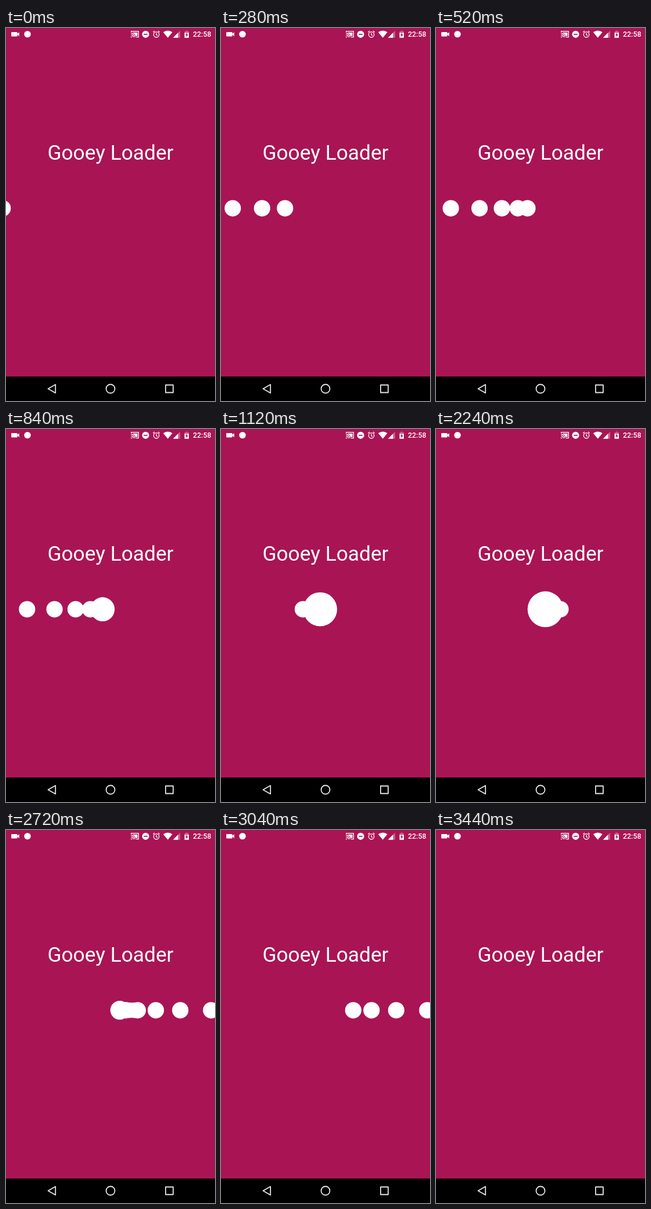
Animation, 360 px wide and 640 px high, one loop 3.52 s. Source, as an HTML page:

```html
<!DOCTYPE html>
<html lang="en">
<head>
<meta charset="utf-8">
<title>Gooey Loader</title>
<style>
  html, body { margin: 0; width: 100%; height: 100%; overflow: hidden; background: #a91454; }
  svg { display: block; width: 360px; height: 640px; }
  text { font-family: Roboto, sans-serif; fill: #fff; }
  .title { font-size: 35.3px; text-anchor: middle; }
  .clock { font-size: 12.4px; font-weight: 500; text-anchor: end; }
  .status { fill: #fff; }
  .line { fill: none; stroke: #fff; stroke-width: 1.3; }
  .cut { fill: none; stroke: #a91454; stroke-width: 1.7; }
  .dim { opacity: .32; }
  .nav { fill: none; stroke: #e4e4e4; stroke-width: 1.8; stroke-linejoin: round; }
</style>
</head>
<body>
<svg viewBox="0 0 360 640">
  <rect width="360" height="640" fill="#a91454"/>

  <g class="status">
    <path d="M10 6.9h8.6q.9 0 .9.9v2l3.3-2.6v7l-3.3-2.6v2q0 .9-.9.9h-8.600q-.9 0-.9-.9v-5.800q0-.9.9-.9z"/>
    <circle cx="37" cy="10.600" r="5.700"/>
    <path class="line" d="M215.700 7.600V5.700h12.600v10h-4.300M215.300 9.200a6.800 6.800 0 0 1 6.800 6.800M215.300 11.800a4.200 4.200 0 0 1 4.200 4.200"/>
    <path d="M218 7.700h8.400v6h-3.300a8 8 0 0 0-5.100-5.400zM215 14.200a2 2 0 0 1 2 2h-2z"/>
    <circle cx="240.500" cy="10.800" r="6.100"/>
    <path class="cut" d="M237.300 10.800h6.400"/>
    <circle class="line" cx="259" cy="11.300" r="4.700"/>
    <path class="line" d="M259 8.600v3l2.100 1.300M253.300 7.300l2.700-2.300M264.700 7.300l-2.700-2.300"/>
    <path d="M270.800 7.300a12.300 12.300 0 0 1 15.800 0l-7.900 9.500z"/>
    <path class="dim" d="M287.800 16.700h12.200v-12.200z"/>
    <path d="M287.800 16.700h8.600v-8.600z"/>
    <path class="dim" d="M307.500 5.700h2.100v-1.300h3.300v1.300h2.100v4h-7.500z"/>
    <path d="M307.500 8.200h7.500v8.600h-7.500z"/>
    <path fill="#a91454" d="M311.900 7.700l-2.900 4.700h1.800v3.300l2.800-4.700h-1.700z"/>
  </g>
  <text class="clock" x="353.500" y="15.300">22:58</text>

  <text class="title" x="180" y="226">Gooey Loader</text>
  <path id="blob" fill="#fff"/>

  <rect y="598" width="360" height="42" fill="#000"/>
  <g class="nav">
    <path d="M85.200 611.800v14.400l-12.700-7.200z"/>
    <circle cx="180" cy="619" r="7.500"/>
    <rect x="274.900" y="612.500" width="13" height="13"/>
  </g>
</svg>
<script>
const LOOP = 3520, STEP = 40;
const COUNT = 8, DOT = 14.1, CORE = 35.2, Y = 309.3;
const LEFT = 163, RIGHT = 197, CURVE = 5.5;
const BORN = 620, GONE = 2790, GROW = 700;
const blob = document.getElementById('blob');

const circle = (x, r) =>
  `M${x - r} ${Y}a${r} ${r} 0 1 1 ${2 * r} 0a${r} ${r} 0 1 1 ${-2 * r} 0z`;

// Dot spacings left until the leading dot reaches the core.
const incoming = t => t < 520 ? 5.54 - 4.54 * t / 520 : 1 - (t - 520) / 100;
// Dot spacings travelled by the leading dot since it left the core.
const outgoing = t => (t - 2052) / 105.5;

// Sticky neck between the core and a nearby dot.
function neck(c, r, x) {
  const mid = (c + x) / 2, waist = DOT * 0.8;
  const [a, ra, b, rb] = c < x ? [c, r, x, DOT] : [x, DOT, c, r];
  return `M${a} ${Y - ra}Q${mid} ${Y - waist} ${b} ${Y - rb}` +
    `V${Y + rb}Q${mid} ${Y + waist} ${a} ${Y + ra}z`;
}

function shape(t) {
  const dots = [];
  for (let i = 0; i < COUNT; i++) {
    const before = incoming(t) + i, after = outgoing(t) - i;
    if (before > 0) dots.push(LEFT - CURVE * before * before);
    if (after > 0) dots.push(RIGHT + CURVE * after * after);
  }
  const seen = dots.filter(x => x > -DOT && x < 360 + DOT);
  let d = seen.map(x => circle(x, DOT)).join('');
  if (t >= BORN && t <= GONE) {
    const c = LEFT + (RIGHT - LEFT) * (t - BORN) / (GONE - BORN);
    const size = Math.min(1, (t - BORN) / GROW, (GONE - t) / GROW);
    const r = DOT + (CORE - DOT) * size;
    d += circle(c, r);
    for (const x of seen) if (Math.abs(x - c) < r + DOT + 3) d += neck(c, r, x);
  }
  return d;
}

const start = performance.now();
function draw() {
  const t = (performance.now() - start) % LOOP;
  blob.setAttribute('d', shape(Math.floor(t / STEP) * STEP));
  requestAnimationFrame(draw);
}
draw();
</script>
</body>
</html>
```
